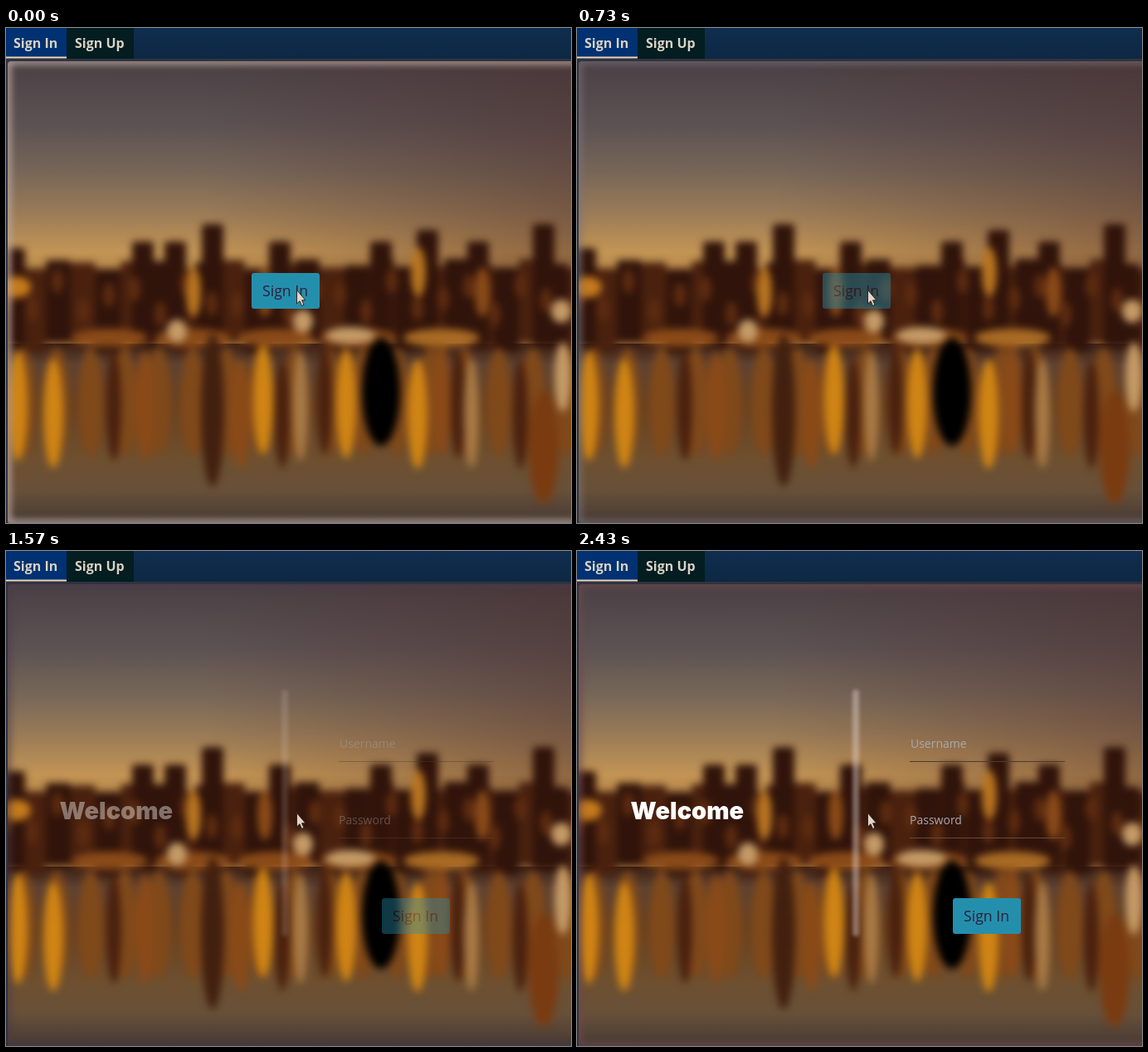
Recreate the animation shown at these times as an HTML page. Size 681 by 596 pixels, loop 2.5 s.

```html
<!DOCTYPE html>
<html lang="en">
<head>
<meta charset="utf-8">
<title>Sign in</title>
<style>
  html, body { margin: 0; width: 100%; height: 100%; overflow: hidden; background: #0e2a48; }
  svg { display: block; }
  text { font-family: "Open Sans", "Noto Sans", sans-serif; }
  .tab { font-size: 16px; font-weight: 700; fill: #d9d3c3; }
  .button { font-size: 17.7px; fill: #2b2038; }
  .label { font-size: 14px; fill: #aaa9ae; }
  .title { font: 900 29px Inter, sans-serif; fill: #fff; }
</style>
</head>
<body>
<svg width="681" height="596" viewBox="0 0 681 596">
  <defs>
    <linearGradient id="sky" gradientUnits="userSpaceOnUse" x1="0" y1="40" x2="0" y2="300">
      <stop offset="0" stop-color="#4a4045"/>
      <stop offset=".3" stop-color="#5d5253"/>
      <stop offset=".52" stop-color="#786758"/>
      <stop offset=".7" stop-color="#9a7b57"/>
      <stop offset=".88" stop-color="#c29455"/>
      <stop offset="1" stop-color="#b58548"/>
    </linearGradient>
    <linearGradient id="dusk">
      <stop offset=".35" stop-color="#4a2a28" stop-opacity="0"/>
      <stop offset="1" stop-color="#4a2a28" stop-opacity=".42"/>
    </linearGradient>
    <linearGradient id="water" x2="0" y2="1">
      <stop offset="0" stop-color="#3c2115"/>
      <stop offset=".12" stop-color="#5e4232"/>
      <stop offset=".35" stop-color="#68411f"/>
      <stop offset=".65" stop-color="#6e5030"/>
      <stop offset=".82" stop-color="#675039"/>
      <stop offset="1" stop-color="#463934"/>
    </linearGradient>
    <linearGradient id="bar" x2="0" y2="1">
      <stop offset="0" stop-color="#0f2d4f"/>
      <stop offset="1" stop-color="#0e2843"/>
    </linearGradient>
    <filter id="soft" filterUnits="userSpaceOnUse" x="-40" y="0" width="770" height="660" color-interpolation-filters="sRGB">
      <feGaussianBlur stdDeviation="5"/>
    </filter>
    <filter id="glow" filterUnits="userSpaceOnUse" x="-20" y="20" width="780" height="600" color-interpolation-filters="sRGB">
      <feGaussianBlur stdDeviation="4"/>
    </filter>
    <filter id="haze" filterUnits="userSpaceOnUse" x="310" y="140" width="50" height="350">
      <feGaussianBlur stdDeviation="2"/>
    </filter>
    <clipPath id="panel"><rect x="2" y="40" width="740" height="557" rx="4"/></clipPath>
  </defs>

  <rect y="37" width="681" height="559" fill="#30333f"/>
  <g clip-path="url(#panel)">
    <rect y="40" width="681" height="350" fill="url(#sky)"/>
    <rect y="40" width="681" height="350" fill="url(#dusk)"/>
    <rect y="380" width="681" height="216" fill="url(#water)"/>
    <g id="city" filter="url(#soft)"></g>
    <g fill="none" filter="url(#glow)" stroke-width="7">
      <rect x="2" y="40" width="740" height="556" stroke="#292d48" opacity=".6"/>
      <rect id="paleEdge" x="2" y="40" width="740" height="556" stroke="#d0bbae"/>
      <rect id="redEdge" x="2" y="40" width="740" height="556" stroke="#8a5550"/>
    </g>
  </g>

  <rect width="681" height="37" fill="url(#bar)"/>
  <rect width="73" height="37" fill="#003172"/>
  <rect x="73" width="81" height="37" fill="#031d21"/>
  <rect y="34.5" width="73" height="2" fill="#f5d5ab"/>
  <text class="tab" x="9" y="24">Sign In</text>
  <text class="tab" x="83" y="24">Sign Up</text>

  <g id="start">
    <rect x="296" y="295" width="82" height="43" rx="3" fill="#248fad"/>
    <text class="button" x="309" y="323">Sign In</text>
  </g>

  <g id="form">
    <text class="title" x="64.5" y="323">Welcome</text>
    <rect x="332" y="167" width="8" height="297" rx="4" fill="#e8dcd8" opacity=".42" filter="url(#haze)"/>
    <text class="label" x="402" y="237">Username</text>
    <text class="label" x="401" y="329">Password</text>
    <path d="M401 253.5H588" stroke="#4d3a30"/>
    <path d="M401 345.5H588" stroke="#6b4a32"/>
    <rect x="453" y="418" width="82" height="43" rx="3" fill="#248fad"/>
    <text class="button" x="466" y="446">Sign In</text>
  </g>

  <path d="M350.5 315.5V332L354 328.7L356.5 334.5L359 333.3L356.6 327.8H361Z" fill="#e2d5c6" stroke="#33241f"/>
</svg>
<script>
const $ = id => document.getElementById(id);
const AMBER = '#cf8414', RUST = '#8a4a18', PALE = '#c49a66', DARK = '#30130a', BROWN = '#4a210e';

const box = (x, y, w, h, fill) =>
  `<rect x="${x}" y="${y}" width="${w}" height="${h}" rx="4" fill="${fill}"/>`;
const blob = (x, y, rx, ry, fill) =>
  `<ellipse cx="${x}" cy="${y}" rx="${rx}" ry="${ry}" fill="${fill}"/>`;
const repeat = (count, shape) => Array.from({ length: count }, (_, i) => shape(i)).join('');
const tower = (x, top) => box(x - 13, top, 26, 384 - top, DARK);
const streaks = (xs, rx, fill) =>
  xs.map((x, i) => blob(x, 455 + 10 * Math.sin(i * 2), rx, 66, fill)).join('');

function city() {
  const lowRoofs = repeat(24, i =>
    box(i * 30 - 12, 284 + 6 * Math.sin(i * 2), 30, 100, i % 2 ? BROWN : DARK));
  const tall = tower(249, 236) + tower(508, 243) + tower(648, 236) + tower(10, 265) +
    [165, 204, 330, 452, 569].map(x => tower(x, 257)).join('');
  const windows = repeat(23, i => blob(i * 31, 325 + 20 * Math.sin(i * 2.4), 7, 15, '#5e2c10')) +
    [226, 312, 497, 574].map((x, i) => blob(x, 318 - 24 * (i === 2), 9, 30, i % 2 ? RUST : '#b87420')).join('') +
    blob(12, 312, 18, 13, '#c47a1c');
  const shore = repeat(5, i => blob(125 + 100 * i, 373, 46, 11, [RUST, '#a86a24'][i >> 2])) +
    blob(415, 370, 30, 10, PALE) +
    [206, 358, 669].map((x, i) => blob(x, 365 - 12 * i, 12, 14, PALE)).join('');
  const reflections = repeat(17, i => blob(20 + i * 41, 450, 15, 65, '#80491a')) +
    streaks([130, 333, 384, 545, 620], 9, BROWN) +
    streaks([167, 283, 525], 11, RUST) +
    streaks([14, 57, 310, 410, 496], 12, AMBER) +
    streaks([355, 561], 9, '#a87a45') +
    blob(249, 460, 14, 92, '#42200f') + blob(648, 505, 18, 68, '#7a3b10') +
    blob(671, 420, 10, 42, PALE) + blob(452, 438, 23, 65, '#000');
  return lowRoofs + tall + windows + shore + reflections;
}
$('city').innerHTML = city();

const LOOP = 2500, FIRST = 190, STEP = 77.24;
const progress = (t, start, length) => Math.min(1, Math.max(0, (t - start) / length));

function draw(now) {
  const t = now % LOOP;
  // The picture advances in steps of about 77 ms
  const time = t < FIRST ? 0 : FIRST + Math.floor((t - FIRST) / STEP + 0.2) * STEP;
  const out = 1 - progress(time, 170, 1000);
  const back = progress(time, 1240, 850);
  $('start').setAttribute('opacity', out);
  $('paleEdge').setAttribute('opacity', out * 0.85);
  $('form').setAttribute('opacity', back);
  $('redEdge').setAttribute('opacity', back * 0.6);
}

const began = performance.now();
function tick() {
  draw(performance.now() - began);
  requestAnimationFrame(tick);
}
tick();
</script>
</body>
</html>
```
